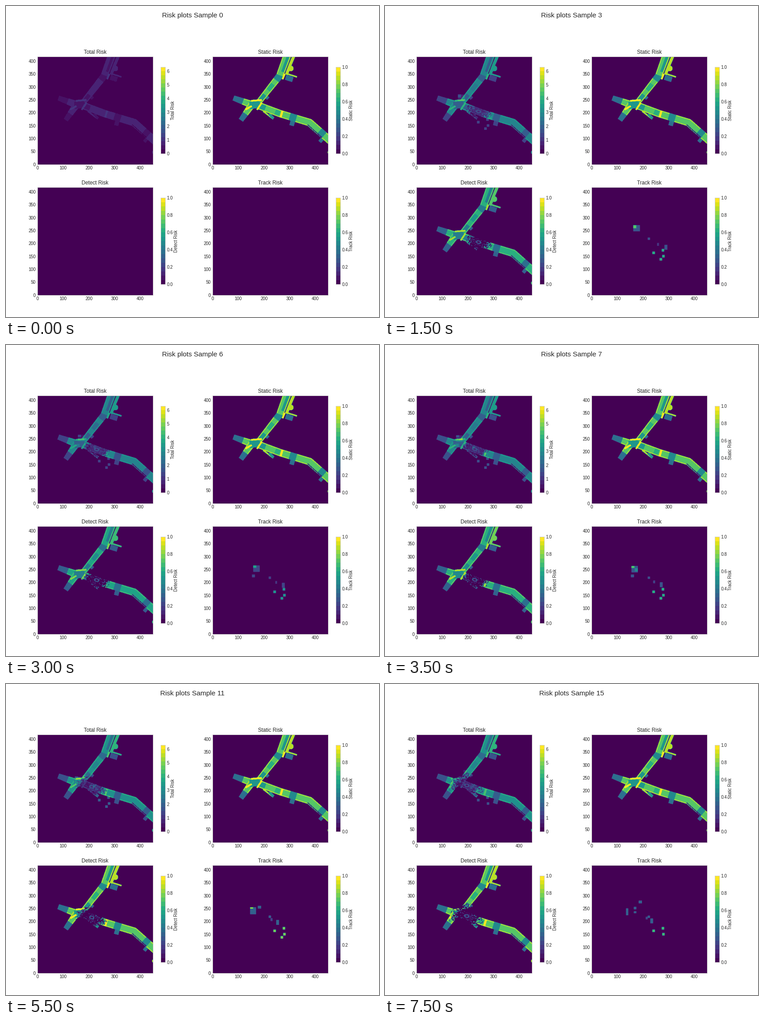
A matplotlib script that plays this animation: 820x683 px, repeating every 8 s.

```python
import numpy as np
import matplotlib
import matplotlib.pyplot as plt
from matplotlib.animation import FuncAnimation

W, H, DPI = 820, 683, 64
PT = 72 / DPI
NX, NY = 450, 418
SAMPLES, STEP = 16, 500
TOP = 6.3
INK = "0.15"
WALK, LANE, MIXED, ROAD, KERB, CROSS = 0.375, 0.52, 0.62, 0.72, 0.87, 1.0

plt.rcParams["font.family"] = "Liberation Sans"

gx, gy = np.meshgrid(np.arange(NX), np.arange(NY))
static = np.zeros((NY, NX))


def frame_of(pts):
    """Distance along and signed distance left of a polyline, per cell."""
    near = np.full(static.shape, np.inf)
    s, d = np.zeros_like(near), np.zeros_like(near)
    start, last = 0, len(pts) - 2
    for i, ((x0, y0), (x1, y1)) in enumerate(zip(pts, pts[1:])):
        size = np.hypot(x1 - x0, y1 - y0)
        ux, uy = (x1 - x0) / size, (y1 - y0) / size
        t = (gx - x0) * ux + (gy - y0) * uy
        side = (gy - y0) * ux - (gx - x0) * uy
        gap = np.hypot(side, t - np.clip(t, -np.inf if i == 0 else 0,
                                         np.inf if i == last else size))
        hit = gap < near
        near[hit], s[hit] = gap[hit], (start + t)[hit]
        d[hit] = (np.sign(side) * gap)[hit]
        start += size
    return s, d, start


def stroke(value, half, *pts):
    s, d, size = frame_of(pts)
    static[(s >= 0) & (s <= size) & (abs(d) < half)] = value


def road(pts, half, blocks=(), kerb=4):
    """Kerbed road; half is the half width at both ends."""
    s, d, size = frame_of(pts)
    inside = (s >= 0) & (s <= size)
    half = half[0] + (half[1] - half[0]) * np.clip(s / size, 0, 1)
    static[inside & (abs(d) < half)] = KERB
    static[inside & (abs(d) < half - kerb)] = ROAD
    for s0, s1, value in blocks:
        lane = value in (LANE, MIXED)
        static[(s >= s0) & (s < s1) & (abs(d) < half - kerb * lane)] = value


def disc(value, x, y, rx, ry):
    static[np.hypot((gx - x) / rx, (gy - y) / ry) < 1] = value


# arms and roads leaving the junction
road([(158, 229), (81, 257)], (15, 10), [(43, 82, WALK)])
road([(152, 231), (110, 171)], (14, 10), [(43, 73, WALK)])
stroke(WALK, 7, (202, 268), (216, 254))
road([(172, 232), (260, 343), (296, 440)], (11, 16),
     [(22, 48, LANE), (70, 100, MIXED), (120, 143, WALK + .1)])
stroke(LANE, 5, (271, 358), (297, 430))
stroke(CROSS, 3.5, (280, 350), (271, 329))

# footpath beside the upper road
stroke(KERB, 6, (318, 426), (301, 386), (286, 347))
disc(KERB, 303, 371, 11, 11)
stroke(KERB, 3, (284, 352), (327, 338))
stroke(WALK, 10, (283, 337), (311, 328))

# long road to the right
stroke(KERB, 3, (196, 206), (235, 176))
stroke(LANE, 5, (220, 195), (236, 178))
stroke(WALK, 9, (312, 172), (306, 150))
stroke(WALK, 7, (426, 100), (415, 87))
road([(180, 227), (263, 196), (376, 162), (470, 79)], (14, 15),
     [(0, 26, LANE), (67, 86, MIXED), (89, 97, CROSS), (126, 152, LANE - .06),
      (257, 281, LANE - .06)])
stroke(0, 1.3, (368, 154), (424, 104))
disc(KERB, 450, 47, 5, 6)

# junction and its crossings
stroke(LANE, 14, (144, 228), (184, 233))
stroke(CROSS, 3.5, (150, 246), (191, 249))
stroke(CROSS, 3.5, (128, 212), (152, 226))
stroke(CROSS, 3.5, (172, 211), (191, 239))


def detect_risk(n):
    """Road risk, thinned in noisy rings around the moving vehicle."""
    if n == 0:
        return np.zeros_like(static)
    dx, dy = gx - (253 - 3.8 * n), gy - (201 + 1.3 * n)
    r, a = np.hypot(dx, 1.4 * dy), np.arctan2(dy, dx)
    noise = np.random.default_rng(n).random((400, 61))
    q = noise[(r / 2.6).astype(int), ((a / np.pi + 1) * 30).astype(int)]
    keep = q >= np.clip((54 + 1.2 * n - r) / 36, 0, 0.85)
    out = static * keep * np.interp(n, (2, 4, 6, 9), (.75, .95, .8, 1))
    out *= np.clip(r / 50, 0.45, 1)
    e = np.hypot((dx + 0.3 * dy) / 10, dy / 7)
    out[e < 1] = 1.0 if n == 1 else 0.3
    out[e < 0.5] = 0.5 if n == 1 else 0
    return out


def track_risk(n):
    out = np.zeros_like(static)
    if n < 3:
        return out
    m = n - 4
    high = np.interp(n, (4, 6, 9, 11, 15), (.62, .52, .87, .76, .67))
    low = 0.45 * high

    def box(v, x, y, w, h):
        x0, y0 = round(x - w / 2), round(y - h / 2)
        out[y0:y0 + round(h), x0:x0 + round(w)] = v

    def glide(*vals):
        return np.interp(n, (4, 11, 15), vals)

    # large slow object with a brighter corner
    x, y, w, h = glide(175, 158, 139), glide(259, 241, 238), glide(26, 23, 9), glide(24, 27, 27)
    box(low, x, y, w, h)
    if n < 12:
        edge = 11 - 0.9 * m
        box(min(1, 1.15 * high), x - w / 2 + 6, y + h / 2 - edge / 2, 12, edge)
    if 7 <= n <= 10:
        box(0.75 * high, x + 6, y - 2, 12, 12)

    # walkers
    if 5 <= n <= 7:
        box(low, 159, 226, 12, 11)
    if n >= 10:
        box(low, 163 + 1.75 * n, 198 + 5.2 * n, 13, 11)
    if n >= 13:
        box(low, 169, 252, 10, 10)
        box(low, 169, 236, 10, 8)
    box(low, 284 - 4.55 * m, 187 + 1.4 * m, 11, 19)
    box(0.7 * low, 254 - 3.6 * m, 198 + 1.4 * m, 8, 11)
    box(low, 222, 219, 9, 9)

    # standing objects
    spots = [(241, 164), (277, 174), (279, 151), (269, 139)]
    for px, py in spots[:4 if n < 14 else 3]:
        box(high, px, py, 10, 10)
    return out


fig = plt.figure(figsize=(W / DPI, H / DPI), dpi=DPI, facecolor="white")


def axes_at(x, y, w, h):
    ax = fig.add_axes([x / W, 1 - (y + h) / H, w / W, h / H])
    ax.tick_params(length=0, pad=4, labelsize=9.6 * PT, labelcolor=INK)
    for side in ax.spines.values():
        side.set(color="0.8", linewidth=PT)
    return ax


def panel(name, x, y, top, levels, label_x):
    cmap = matplotlib.colormaps["viridis"].resampled(levels)
    style = dict(cmap=cmap, vmin=0, vmax=top, origin="lower", aspect="auto")
    ax = axes_at(x, y, 254, 236.4)
    img = ax.imshow(np.zeros((NY, NX)), **style)
    ax.set(xlim=(0, NX - 1), ylim=(0, NY - 1),
           xticks=range(0, 401, 100), yticks=range(0, 401, 50))
    ax.set_title(name, fontsize=11.5 * PT, color=INK, pad=6.5 * PT)

    bar = axes_at(x + 271.4, y + 22.8, 9.4, 189.8)
    mids = (np.arange(levels) + 0.5) * top / levels
    bar.imshow(mids[:, None], extent=(0, 1, 0, top), interpolation="nearest",
               **style)
    bar.yaxis.tick_right()
    bar.set(xticks=[], yticks=range(7) if top > 1 else np.arange(6) / 5)
    fig.text((x + label_x) / W, 1 - (y + 118) / H, name, rotation=90,
             ha="center", va="center", fontsize=9.6 * PT, color=INK)
    return img


total_img = panel("Total Risk", 69, 111.2, TOP, 21, 297.5)
static_img = panel("Static Risk", 454, 111.2, 1, 20, 305)
detect_img = panel("Detect Risk", 69, 398.3, 1, 20, 305)
track_img = panel("Track Risk", 454, 398.3, 1, 20, 305)
static_img.set_data(static)
heading = fig.text(0.5, 1 - 25 / H, "", ha="center", va="baseline",
                   fontsize=15.3 * PT, color=INK)


def update(n):
    detect, track = detect_risk(n), track_risk(n)
    detect_img.set_data(detect)
    track_img.set_data(track)
    total_img.set_data(np.minimum(static + 3.5 * detect + 2.4 * track, TOP))
    heading.set_text(f"Risk plots Sample {n}")
    return total_img, detect_img, track_img, heading


anim = FuncAnimation(fig, update, frames=SAMPLES, interval=STEP, repeat=True,
                     repeat_delay=0, blit=False)
plt.show()
```
